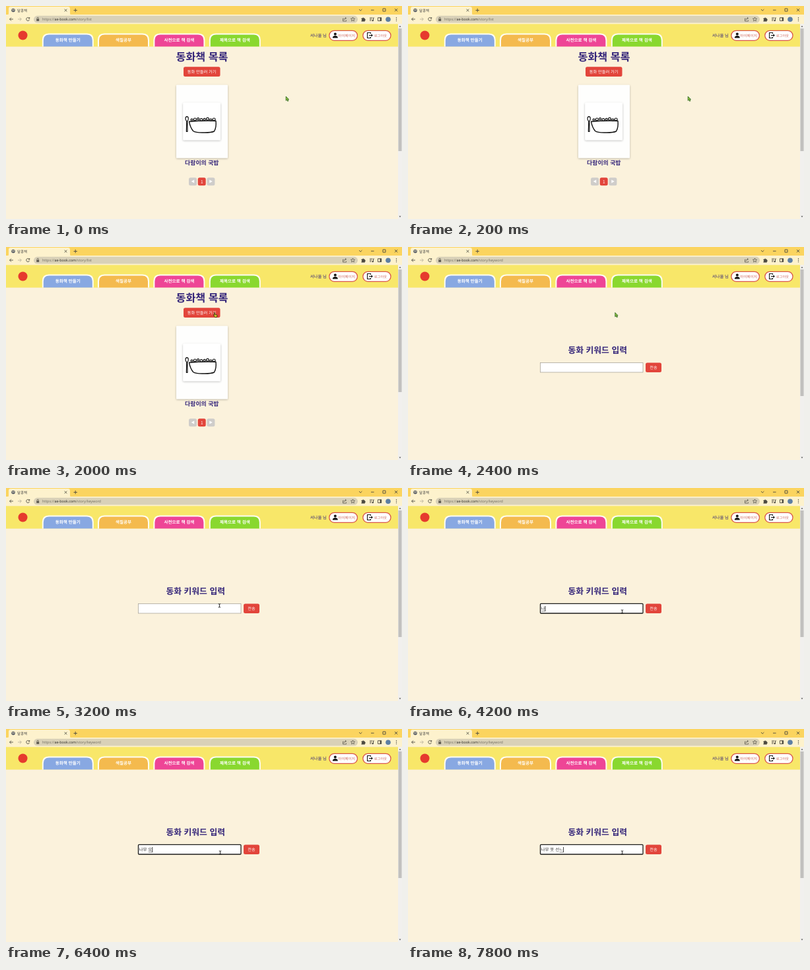
An HTML page that plays this animation: 600 by 323 pixels, repeating every 8 s.

```html
<!DOCTYPE html>
<html lang="ko">
<head>
<meta charset="utf-8">
<title>Story keywords</title>
<style>
html, body { margin: 0; width: 100%; height: 100%; overflow: hidden; background: #fbf2dc; }
svg { display: block; width: 100%; height: 100%; }
text { font-family: "Noto Sans CJK KR", "Noto Sans CJK", "Noto Sans CJK JP", sans-serif; text-rendering: geometricPrecision; white-space: pre; }
.url { font-family: "Open Sans", sans-serif; font-size: 5.4px; }
.ico { fill: none; stroke: #4c4a40; stroke-width: .9; }
.ink { fill: none; stroke: #111; stroke-width: 1.4; stroke-linecap: round; stroke-linejoin: round; }
</style>
</head>
<body>
<svg id="stage" viewBox="0 0 600 323"></svg>
<script>
const LOOP = 8000, STEP = 200;
const RED = '#e2453b', NAVY = '#35267a';

const rect = (x, y, w, h, fill, r = 0, more = '') =>
  `<rect x="${x}" y="${y}" width="${w}" height="${h}" rx="${r}" fill="${fill}" ${more}/>`;
const label = (x, y, size, fill, str, weight = 400, anchor = 'middle') =>
  `<text x="${x}" y="${y}" font-size="${size}" fill="${fill}" font-weight="${weight}" text-anchor="${anchor}">${str}</text>`;
const path = (d, cls = 'ico', more = '') => `<path class="${cls}" d="${d}" ${more}/>`;

function browser() {
  return rect(0, 0, 600, 14, '#fbd45f') +
    `<path d="M1 14Q4 14 4 11V4Q4 1 7 1H94Q97 1 97 4V11Q97 14 100 14Z" fill="#fdf2cd"/>` +
    rect(0, 13, 600, 14.3, '#fdf2cd') +
    `<circle cx="11" cy="6.5" r="2.8" fill="#5b6068"/>` +
    path('M9 5.5l2 .6-.6 1.5M12.2 4.6l-.4 1.2 1.4.8', 'ico', 'style="stroke:#fdf2cd;stroke-width:.7"') +
    label(17, 8.5, 5.4, '#3c3c3c', '달콩책', 400, 'start') +
    path('M88.7 4.7l3.6 3.6m0-3.6l-3.6 3.6M102.5 6.5h5.4m-2.7-2.7v5.4') +
    path('M535 5l2.2 2.2L539.4 5M553 6.2h4.6M571 4h4v4h-4zM589 4l4.2 4.2m0-4.2L589 8.200') +
    path('M10.800 20H5.6m2.300-2.400L5.500 20l2.400 2.400') +
    path('M18 20h5.200m-2.300-2.400L23.300 20l-2.400 2.400', 'ico', 'style="stroke:#b9b29a"') +
    path('M35.300 18.500a2.500 2.500 0 1 0 .3 2.200M35.700 17v2h-2') +
    rect(42, 14.8, 491, 10.8, '#d9d1b8', 5.4) +
    rect(46.2, 19.4, 4, 3.4, '#5a574c', .5) + path('M47 19.500v-1a1.200 1.200 0 0 1 2.400 0v1', 'ico', 'style="stroke-width:.7"') +
    `<text class="url" x="55" y="22.1" fill="#706c60">https://<tspan fill="#2b2a26">ae-book.com</tspan>/story/<tspan id="page"></tspan></text>` +
    path('M511.500 19h-1v4h5v-1.500M512 21.500q.3-3 3-3m-1-1.500l1.600 1.500-1.600 1.500', 'ico', 'style="stroke-width:.7"') +
    path('M525.500 17l.9 2 2.200.2-1.700 1.500.5 2.200-1.900-1.200-1.900 1.200.5-2.200-1.700-1.500 2.200-.2z', 'ico', 'style="stroke-width:.7"') +
    `<path d="M538.500 18.500h1.700a1 1 0 0 1 2 0h1.600v1.600a1 1 0 0 1 0 2v1.400h-5.300v-1.600a1 1 0 0 0 0-1.900z" fill="#4c4a40"/>` +
    path('M551 18h4.500M551 20h3M551 22h2.500M556.500 22v-4h1.500') +
    `<circle cx="555.700" cy="22" r="1.200" fill="#4c4a40"/>` +
    path('M563.500 17.700h5.200v4.800h-5.200z') + rect(566.6, 17.7, 2.1, 4.8, '#4c4a40') +
    `<circle cx="579" cy="20.200" r="3.800" fill="#5d7fa3"/>` +
    [17.8, 20.2, 22.6].map(y => `<circle cx="591.500" cy="${y}" r=".7" fill="#4c4a40"/>`).join('');
}

function navTab(x, fill, str) {
  const top = (l, t, r, w) => `M${l} 61.600V${t + r}Q${l} ${t} ${l + r} ${t}H${l + w - r}Q${l + w} ${t} ${l + w} ${t + r}V61.600Z`;
  return `<path d="${top(x, 41.5, 10, 78)}" fill="#fffdf3"/><path d="${top(x + 2, 43.6, 8.5, 74)}" fill="${fill}"/>` +
    label(x + 39, 54.2, 6.55, '#fff', str, 700);
}

function header() {
  const pill = (x, w) => rect(x, 37.3, w, 15, '#fff', 7.5, 'stroke="#d9584a" stroke-width="1.300"');
  return rect(0, 27.3, 594, 34.3, '#f8e769') +
    `<circle cx="25.500" cy="44.500" r="7" fill="#e63a2e"/>` +
    navTab(54.8, '#88a8e2', '동화책 만들기') + navTab(139, '#f4ba4e', '색칠공부') +
    navTab(223.4, '#ee4596', '사전으로 책 검색') + navTab(307.8, '#89d82f', '제목으로 책 검색') +
    label(460.7, 47, 6.4, NAVY, '서나울 님', 500, 'start') +
    pill(489.8, 42.6) + pill(540.8, 42.2) +
    `<circle cx="498.800" cy="42.500" r="2" fill="#151515"/><path d="M494.800 48.600q0-3.600 4-3.600t4 3.600z" fill="#151515"/>` +
    path('M552.500 42v-1.500h-5v8h5V47M550 44.500h5m-1.600-1.700l1.700 1.700-1.700 1.700', 'ico', 'style="stroke:#151515;stroke-width:1.100"') +
    label(516.2, 46.5, 5.6, '#d06a60', '마이페이지') + label(567.5, 46.5, 5.3, '#d06a60', '로그아웃');
}

function bowl() {
  let rice = '';
  for (let i = 0; i < 8; i++)
    rice += `<circle class="ink" cx="${281.5 + i * 4.8}" cy="${172.6 - i % 3 * .7}" r="${1.5 + i % 2 * .4}" style="stroke-width:1.200"/>`;
  return path('M277.500 175.200Q297 173.600 318 174.200Q319 184 315.500 190Q311 192.200 299 192Q287 192.200 283.500 189.500Q279 184 277.500 175.200Z', 'ink') + rice +
    path('M273.800 174.500C271 172.500 271.700 168 274 167.700C276.800 167.800 277 172.500 274.800 174.500L275 190.300H273.300Z', 'ink', 'style="stroke-width:1.200"');
}

function listPage() {
  const pager = (x, fill) => rect(x, 260.3, 12, 12, fill, 2.5);
  return label(297, 83, 16.2, NAVY, '동화책 목록', 700) +
    rect(269, 92.3, 55.5, 14.7, RED, 2.5) + label(296.7, 101.9, 6.25, '#fff', '동화 만들러 가기') +
    rect(258, 119.8, 78, 110.6, '#fefefd', 1, 'filter="url(#soft)"') +
    rect(268.3, 146.8, 56.7, 56.4, '#fff', 1, 'filter="url(#soft)"') + bowl() +
    label(296.8, 241.3, 8.9, NAVY, '다람이의 국밥', 700) +
    pager(277, '#cfcdca') + pager(290.7, RED) + pager(304.4, '#cfcdca') +
    `<path d="M285.200 263.500v5l-4.500-2.500zM308.300 263.500v5l4.500-2.500z" fill="#fff"/>` +
    label(296.7, 268.6, 6.5, '#fff', '1');
}

function keywordPage() {
  return label(287.2, 160.6, 12.8, NAVY, '동화 키워드 입력', 700) +
    `<rect id="field" x="200.500" y="175.400" width="155.500" height="14.600" fill="#fff"/>` +
    label(201.6, 185.2, 6.5, '#333', '<tspan id="typed"></tspan>', 400, 'start') +
    `<path id="under" stroke="#333" stroke-width=".6"/><path id="caret" stroke="#111" stroke-width=".8"/>` +
    rect(360, 175.5, 24, 14.5, RED, 2.5) + label(372, 185.1, 6.2, '#fff', '전송');
}

const pointers =
  `<path id="arrow" d="M0 0V6.200L1.500 4.900L2.500 7.200L3.700 6.600L2.700 4.400H4.300Z" fill="#8fc63f" stroke="#235c18" stroke-width=".8"/>` +
  `<path id="hand" d="M1 0Q1.900 0 1.900 1V3L4.500 3.500Q5.200 3.800 5 5L4.400 7H1.500L-.6 4.300Q-.3 3.500 .4 4.200V1Q.3 0 1 0Z" fill="#d3c52c" stroke="#26240d" stroke-width=".8"/>` +
  `<path id="beam" d="M-1.700-2.500Q0-2.500 0-2Q0-2.500 1.700-2.500M0-2V2.200M-1.700 2.700Q0 2.700 0 2.200Q0 2.700 1.700 2.700" fill="none" stroke="#111" stroke-width=".9"/>`;

const stage = document.getElementById('stage');
stage.innerHTML =
  `<defs><filter id="soft" x="-20%" y="-20%" width="140%" height="140%"><feDropShadow dx="0" dy="1" stdDeviation="1.600" flood-opacity=".28"/></filter></defs>` +
  rect(0, 0, 600, 323, '#fbf2dc') + browser() + header() +
  `<g id="list">${listPage()}</g><g id="keyword">${keywordPage()}</g>` +
  rect(594, 27.3, 6, 296, '#f1f0ee') + `<rect id="thumb" x="594.500" y="34" width="5" fill="#c1c0be"/>` +
  `<path d="M595.500 31.800l1.500-2 1.500 2zM595.500 318.500l1.500 2 1.500-2z" fill="#555"/>` + pointers;

const el = {};
for (const node of stage.querySelectorAll('[id]')) el[node.id] = node;
const show = (node, on) => node.setAttribute('visibility', on ? 'visible' : 'hidden');

// Time, typed text, caret visible
const typing = [
  [3800, '', 1], [4000, 'ㄴ', 1], [4200, '나', 1], [4400, '남', 1],
  [4800, '나무', 1], [5000, '나무 ', 1], [5200, '나무 ㅇ', 1], [5400, '나무 오', 1],
  [5800, '나무 오', 0], [6400, '나무 오', 1], [7000, '나무 옷', 1],
  [7200, '나무 옷 ', 1], [7400, '나무 옷 ㅅ', 1], [7600, '나무 옷 선', 1], [7800, '나무 옷 선ㄴ', 1]
];

const ease = (t, from, to) => {
  const k = Math.min(1, Math.max(0, (t - from) / (to - from)));
  return k * k * (3 - 2 * k);
};

function pointerAt(t) {
  if (t < 2400) {
    const k = ease(t, 1200, 2000);
    return [424.2 - 109.2 * k, 137.2 - 37.7 * k];
  }
  const k = ease(t, 2400, 3400);
  return [313.800 + 10.700 * k, 99.500 + 87.900 * k];
}

function drawTyping(t) {
  const [, str, blink] = typing.filter(s => s[0] <= t).pop() || [0, '', 0];
  const focus = t >= 3800;
  el.field.setAttribute('stroke', focus ? '#1d1d1d' : '#aaa69c');
  el.field.setAttribute('stroke-width', focus ? 1.3 : .8);
  el.field.setAttribute('rx', focus ? 1 : 0);
  el.typed.textContent = str;
  const x = 202 + (str ? el.typed.getComputedTextLength() : 0);
  el.caret.setAttribute('d', `M${x} 179V187`);
  el.under.setAttribute('d', `M${x - 6} 186.800H${x}`);
  return { caret: blink, under: str && !str.endsWith(' ') };
}

function draw(now) {
  const t = Math.floor(now % LOOP / STEP) * STEP;
  const list = t < 2400;
  show(el.list, list);
  show(el.keyword, !list);
  el.page.textContent = list ? 'list' : 'keyword';
  el.thumb.setAttribute('height', list ? 186 : 192);
  const marks = drawTyping(t);
  show(el.caret, !list && marks.caret);
  show(el.under, !list && marks.under);

  const [x, y] = pointerAt(t);
  const kind = list && x < 324 && y < 107 ? 'hand' : !list && y > 175 ? 'beam' : 'arrow';
  for (const name of ['arrow', 'hand', 'beam']) {
    show(el[name], name === kind);
    el[name].setAttribute('transform', `translate(${x} ${y})`);
  }
}

const start = performance.now();
function tick() {
  draw(performance.now() - start);
  requestAnimationFrame(tick);
}
tick();
</script>
</body>
</html>
```
